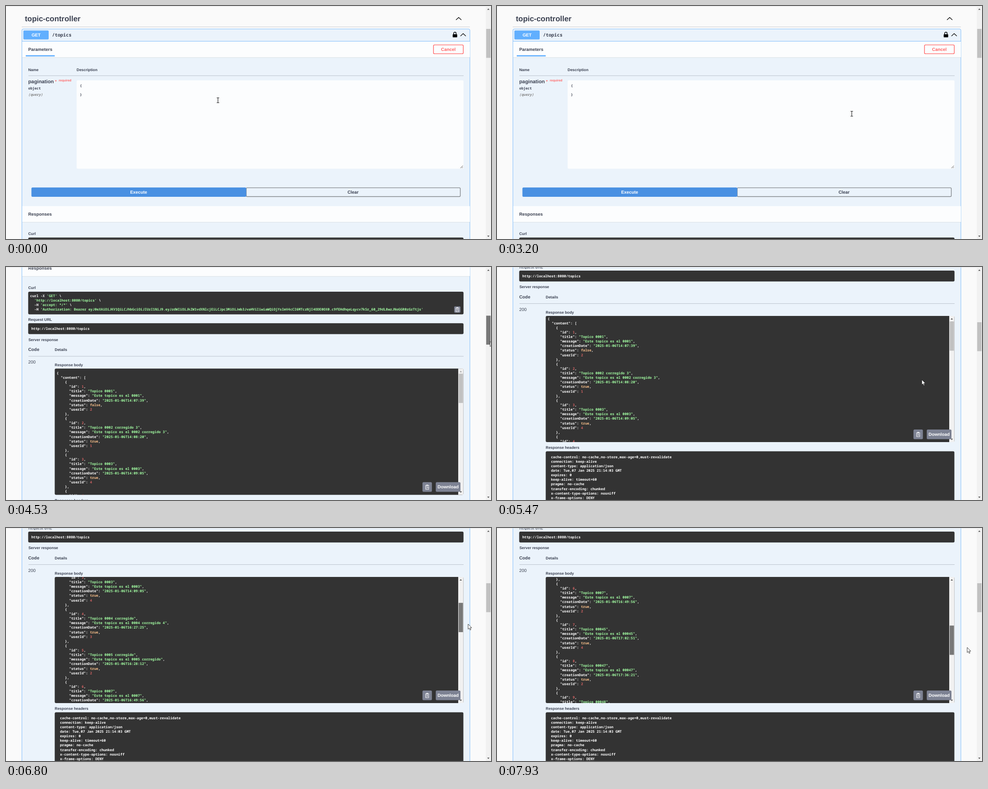
Write an HTML page that moves like this. It is 1080 px wide and 519 px high and loops after 8 s.

```html
<!DOCTYPE html>
<html lang="en">
<head>
<meta charset="utf-8">
<title>topic-controller</title>
<style>
  html, body { margin: 0; width: 100%; height: 100%; overflow: hidden; background: #fafafa; }
  svg { display: block; }
  #stage { width: 100vw; height: 100vh; }
  text { white-space: pre; text-rendering: geometricPrecision; fill: #3b4151;
         font: bold 8.44px "Liberation Sans", Arial, sans-serif; }
  text.mono { font: bold 7.72px "Noto Sans Mono", "DejaVu Sans Mono", monospace; }
  text.code { fill: #fff; }
  .str { fill: #a2fca2; } .num { fill: #d36363; } .lit { fill: #fcc28c; }
</style>
</head>
<body>
<svg id="stage" viewBox="0 0 1080 519"></svg>
<script>
const LOOP = 8000, STEP = 1000 / 15, LINE = 10.13;
const stage = document.getElementById('stage');

function el(parent, tag, attrs = {}, content) {
  const node = document.createElementNS('http://www.w3.org/2000/svg', tag);
  for (const key in attrs) node.setAttribute(key, attrs[key]);
  if (content !== undefined) node.textContent = content;
  return parent.appendChild(node);
}
const rect = (p, x, y, width, height, fill, rx = 0, more = {}) =>
  el(p, 'rect', { x, y, width, height, fill, rx, ...more });
const path = (p, d, stroke, width = 1, fill = 'none', more = {}) =>
  el(p, 'path', { d, stroke, 'stroke-width': width, fill, ...more });
const label = (p, x, y, str, size = 8.44, style = '') =>
  el(p, 'text', { x, y, style: `font-size:${size}px;${style}` }, str);
const mono = (p, x, y, str, style = '', cls = 'mono') =>
  el(p, 'text', { x, y, class: cls, style }, str);

// A line of code; the rule returns a colour class for each matched token.
function code(p, x, y, line, pattern, classify) {
  const node = mono(p, x, y, '', '', 'mono code');
  for (const part of line.split(pattern)) {
    if (part) el(node, 'tspan', { class: classify(part) }, part);
  }
}

const defs = el(stage, 'defs');
el(el(defs, 'filter', { id: 'soft', x: '-5%', y: '-60%', width: '110%', height: '220%' }),
  'feGaussianBlur', { stdDeviation: 1.7 });

const page = el(stage, 'g');
const blue = '#61affe', dark = '#333', grey = '#7d8293';

function chevron(x, y) {
  path(page, `M${x} ${y}l6-5.6 6 5.6`, '#111', 1.4);
}
function sectionHead(y, height) {
  rect(page, 36, y + 1, 997, height, '#000', 0, { opacity: .09 });
  rect(page, 36, y, 997, height, '#fcfdfe');
}
function rule(x1, x2, y, opacity) {
  rect(page, x1, y, x2 - x1, .8, '#3b4151', 0, { opacity });
}
function clipboard(p, cx, cy, s) {
  const g = el(p, 'g', { transform: `translate(${cx} ${cy}) scale(${s})` });
  path(g, 'M3.5-1V-4H-3.5V5H3.5V3', '#fff', 1);
  rect(g, -1.8, -5.4, 3.6, 2.4, '#fff', .5);
  path(g, 'M-2-1.3H1.5M-2 .7H-.5M-2 2.7H-.5M5 1.2H.8M2.6-.6L.8 1.2 2.6 3', '#fff', .9);
}

// Heading and operation summary
label(page, 42, 34.3, 'topic-controller', 16.9);
chevron(1002, 31);
rule(35, 1033, 46, .3);
rect(page, 35.4, 51.2, 997.6, 1400, '#ebf3fb', 3, { stroke: blue, 'stroke-width': .8 });
rect(page, 36, 78, 997, .8, blue);
rect(page, 38.7, 54.6, 56.3, 19.8, blue, 2);
label(page, 67, 67.8, 'GET', 9.85, 'fill:#fff;text-anchor:middle');
mono(page, 102.5, 68, '/topics', 'font-size:10.32px');
path(page, 'M996.9 63.5V61a2.7 2.7 0 0 1 5.4 0V63.5', '#000', 1.5);
rect(page, 994.7, 63, 10, 6.8, '#000', 1);
chevron(1012, 67);

// Parameters
sectionHead(79, 35.3);
label(page, 49.5, 99.7, 'Parameters', 9.85);
rect(page, 44, 109.6, 64.5, 2.8, blue);
rect(page, 951.9, 86.6, 66.4, 19.8, 'none', 2.5, { stroke: '#ff6060', 'stroke-width': 1.4 });
label(page, 985, 99.7, 'Cancel', 9.85, 'fill:#ff6060;text-anchor:middle');
label(page, 49.5, 144.7, 'Name');
label(page, 157.3, 144.7, 'Description');
rule(50, 1019, 154.8, .35);
label(page, 49.5, 172.3, 'pagination', 11.26);
label(page, 109.3, 171.3, '*', 9, 'fill:#f66');
label(page, 117.5, 167.9, 'required', 7.03, 'fill:#f66');
mono(page, 49.5, 186.3, 'object');
mono(page, 49.5, 200.4, '(query)', 'font-style:italic;font-weight:600;fill:#808080');
rect(page, 157.3, 165.6, 861.5, 196.8, '#fcfdfe', 3);
mono(page, 164.5, 180.2, '{');
mono(page, 164.5, 199.6, '}');
path(page, 'M1011.8 361.2l5.6-5.6M1015 361.2l2.4-2.4', '#444', .9);

// Buttons
const glow = rect(page, 57, 404.3, 478, 20.6, '#000', 2, { filter: 'url(#soft)' });
rect(page, 535, 404.9, 476.6, 19.6, '#ebf3fb', 2, { stroke: '#808488', 'stroke-width': 1.4 });
rect(page, 56.6, 404.2, 478.4, 20.8, '#4990e2', 2.5);
label(page, 295.4, 417.6, 'Execute', 9.85, 'fill:#fff;text-anchor:middle');
label(page, 772.8, 417.6, 'Clear', 9.85, 'text-anchor:middle');

// Responses
sectionHead(445.8, 35.4);
label(page, 49.5, 466.7, 'Responses', 9.85);
const live = el(page, 'g');
label(live, 49.5, 509.9, 'Curl');
rect(live, 49.4, 515.8, 969.4, 50.4, dark, 3);
const token = 'eyJ0eXAiOiJKV1QiLCJhbGciOiJIUzI1NiJ9.' +
  'eyJzdWIiOiJkZW1vdXNlcjEiLCJpc3MiOiJmb3JvaHViIiwiaWQiOjYsImV4cCI6MTczNjI4ODE0OX0.' +
  'c9fEHdhqeLqycv7kSr_60_29dL8wzJNoGGR0zGzTtjs';
[
  "curl -X 'GET' \\",
  "  'http://localhost:8080/topics' \\",
  "  -H 'accept: */*' \\",
  `  -H 'Authorization: Bearer ${token}'`
].forEach((line, i) => code(live, 53.8, 527.6 + i * LINE, line, /('[^']*')/,
  part => part[0] === "'" ? 'str' : ''));
rect(live, 998, 548.4, 14, 14, grey, 2);
clipboard(live, 1005, 555.6, .95);
label(live, 49.5, 580.8, 'Request URL');
rect(live, 49.4, 586, 969.4, 24.2, dark, 3);
mono(live, 56.4, 601.1, 'http://localhost:8080/topics', '', 'mono code');
label(live, 50, 625.3, 'Server response');
label(live, 49.5, 647.8, 'Code', 9.85);
label(live, 108.6, 648, 'Details');
rule(50, 1019, 659.2, .35);
label(live, 49.5, 676, '200', 9.85, 'font-weight:400');
label(live, 108.6, 681.7, 'Response body');

// Response body with its own scroll area
const BODY = { x: 108.5, y: 686.9, w: 910, h: 281.2 };
rect(live, BODY.x, BODY.y, BODY.w, BODY.h, dark, 3);
const view = el(live, 'svg', { x: BODY.x, y: BODY.y, width: 898, height: BODY.h, overflow: 'hidden' });
const json = el(view, 'g');
const topics = [
  ['0001', '0001', '14:07:39', false, 2],
  ['0002 corregido 3', '0002 corregido 3', '14:08:20', true, 1],
  ['0003', '0003', '14:09:05', true, 4],
  ['0004 corregido', '0004 corregido 4', '16:27:25', true, 3],
  ['0005 corregido', '0005 corregido', '16:28:12', true, 2],
  ['0007', '0007', '16:49:56', true, 2],
  ['00045', '00045', '17:02:51', true, 4],
  ['00047', '00047', '17:36:21', true, 2],
  ['00048', '00048', '17:40:10', true, 2]
].map(([title, message, time, status, userId], i) => ({
  id: i + 1, title: 'Topico ' + title, message: 'Este topico es el ' + message,
  creationDate: '2025-01-06T' + time, status, userId
}));
function jsonClass(part) {
  if (/^"/.test(part)) return /:$/.test(part) ? '' : 'str';
  if (/^\d/.test(part)) return 'num';
  return /^(true|false)$/.test(part) ? 'lit' : '';
}
JSON.stringify({ content: topics }, null, 2).split('\n').forEach((line, i) =>
  code(json, 4.3, 12.6 + i * LINE, line, /("[^"]*":?|\b\d+\b|true|false)/, jsonClass));

const BAR = 1007;
rect(live, BAR, BODY.y, 11.5, BODY.h, '#f1f1f1');
const innerUp = path(live, `M${BAR + 3.2} ${BODY.y + 8}h5l-2.5-3z`, 'none', 0);
path(live, `M${BAR + 3.2} ${BODY.y + 273.6}h5l-2.5 3z`, 'none', 0, '#505050');
const innerThumb = rect(live, BAR + 1, 0, 9.6, 65.2, '#c1c1c1');
rect(live, 927.4, 940, 21, 21.4, grey, 2.5);
clipboard(live, 937.9, 951, 1);
rect(live, 957, 940, 55, 21.4, grey, 2.5);
label(live, 984.6, 954, 'Download', 9.85, 'fill:#fff;text-anchor:middle');

// Response headers
label(live, 108.6, 983.4, 'Response headers');
rect(live, 108.5, 988.6, 910, 160, dark, 3);
[
  'cache-control: no-cache,no-store,max-age=0,must-revalidate',
  'connection: keep-alive',
  'content-type: application/json',
  'date: Tue,07 Jan 2025 21:14:03 GMT',
  'expires: 0',
  'keep-alive: timeout=60',
  'pragma: no-cache',
  'transfer-encoding: chunked',
  'x-content-type-options: nosniff',
  'x-frame-options: DENY'
].forEach((line, i) => mono(live, 120.2, 1003.7 + i * LINE, line, '', 'mono code'));

// Window edge and page scrollbar
rect(stage, 0, 0, 1080, .9, '#e3e4e6');
rect(stage, 1068.4, 0, 11.6, 519, '#f1f1f1');
path(stage, 'M1071.6 8.6h5l-2.5-3z', 'none', 0, '#505050');
path(stage, 'M1071.6 511.6h5l-2.5 3z', 'none', 0, '#505050');
const pageThumb = rect(stage, 1069.3, 51, 9.7, 64.5, '#c1c1c1');

// Pointers, each with its hot spot at 0,0
const pointers = {
  arrow: path(stage, 'M0 0V11.4L2.6 9 4.4 13.2 6.3 12.4 4.5 8.3H8Z', '#111', .8, '#fff'),
  beam: path(stage, 'M-2.7-5.5H-.6L0-5 .6-5.5H2.7M0-5V5M-2.7 5.5H-.6L0 5 .6 5.5H2.7', '#111', 1.1),
  hand: path(stage, 'M-1 .8Q0-.6 1 .8V5L6 6.4Q7.4 7 7 9L6 14.5H-.6L-4.4 9.4Q-4.6 7.4-2.8 8L-1 9.4Z',
    '#111', .8, '#fff')
};

// Monotone cubic through [time, value] keys: smooth, without overshoot.
function ease(keys, t, col = 1) {
  const last = keys.length - 1;
  if (t <= keys[0][0]) return keys[0][col];
  if (t >= keys[last][0]) return keys[last][col];
  let i = 0;
  while (t >= keys[i + 1][0]) i++;
  const slope = k => (keys[k + 1][col] - keys[k][col]) / (keys[k + 1][0] - keys[k][0]);
  const tangent = k => {
    if (k === 0 || k === last) return 0;
    const a = slope(k - 1), b = slope(k);
    return a * b > 0 ? 2 * a * b / (a + b) : 0;
  };
  const span = keys[i + 1][0] - keys[i][0], u = (t - keys[i][0]) / span, v = 1 - u;
  return keys[i][col] * v * v * (1 + 2 * u) + keys[i + 1][col] * u * u * (3 - 2 * u) +
    span * u * v * (tangent(i) * v - tangent(i + 1) * u);
}

const pointerKeys = [
  [0, 472, 210], [270, 236, 255], [470, 400, 345], [670, 655, 290], [870, 600, 141],
  [1000, 700, 122], [1200, 893, 230], [1430, 790, 360], [1600, 661, 391], [1730, 487, 422],
  [1870, 487, 424], [2530, 487, 424], [2730, 531, 383], [2800, 531, 383], [3200, 790, 240],
  [3667, 1078, 108.4], [4950, 1078, 180.4], [5050, 1078, 180.4], [5250, 1030, 212],
  [5466, 946, 251], [5670, 946, 251], [6100, 1013, 183], [6200, 1013, 183], [6530, 1020, 198],
  [6800, 1029, 214], [7400, 1039, 244], [7933, 1047, 266]
];
const scrollKeys = [[3733, 0], [4067, 125.5], [4533, 460.5], [4733, 555], [4850, 555], [5000, 578]];
const wheelKeys = [[5400, 0], [5467, 4], [5600, 45], [5733, 70.4]];
const RATIO = .1246;
const within = (t, from, to) => t >= from && t < to;
const thumbColour = (drag, hover) => drag ? '#787878' : hover ? '#a8a8a8' : '#c1c1c1';

function pointerKind(x, y, busy) {
  if (busy) return 'arrow';
  if (x > 157 && x < 1010 && y > 165 && y < 362) return 'beam';
  return x > 57 && x < 1012 && y > 404 && y < 425 ? 'hand' : 'arrow';
}

function draw(t) {
  const scroll = ease(scrollKeys, t);
  const dragPage = within(t, 3720, 5010), dragBody = t >= 6200;
  const x = ease(pointerKeys, t);
  const y = dragPage ? 108.4 + scroll * RATIO : ease(pointerKeys, t, 2);
  const bodyScroll = dragBody ? 201 + (y - 214) * 4.212 : ease(wheelKeys, t);
  const reloading = within(t, 2390, 2520);

  page.setAttribute('transform', `translate(0 ${-scroll})`);
  live.setAttribute('visibility', reloading ? 'hidden' : 'visible');
  json.setAttribute('transform', `translate(0 ${-bodyScroll})`);
  glow.setAttribute('opacity', .3 * ease([[1733, 0], [2070, 1], [2530, 1], [2733, 0]], t));

  pageThumb.setAttribute('y', 51 + scroll * RATIO);
  pageThumb.setAttribute('height', reloading ? 71 : 64.5);
  pageThumb.setAttribute('fill', thumbColour(dragPage, x > 1068));
  innerThumb.setAttribute('y', BODY.y + 11.4 + bodyScroll * .231);
  innerThumb.setAttribute('fill', thumbColour(dragBody, t > 5700 && x > BAR));
  innerUp.setAttribute('fill', bodyScroll > 0 ? '#505050' : '#a3a3a3');

  const kind = pointerKind(x, y, scroll > 0);
  for (const name in pointers) {
    pointers[name].setAttribute('visibility', name === kind ? 'visible' : 'hidden');
  }
  pointers[kind].setAttribute('transform', `translate(${x} ${y})`);
}

const start = performance.now();
function tick(now) {
  const t = Math.max(0, now - start) % LOOP;
  draw(Math.floor((t + 4) / STEP) * STEP % LOOP);
  requestAnimationFrame(tick);
}
draw(0);
requestAnimationFrame(tick);
</script>
</body>
</html>
```
